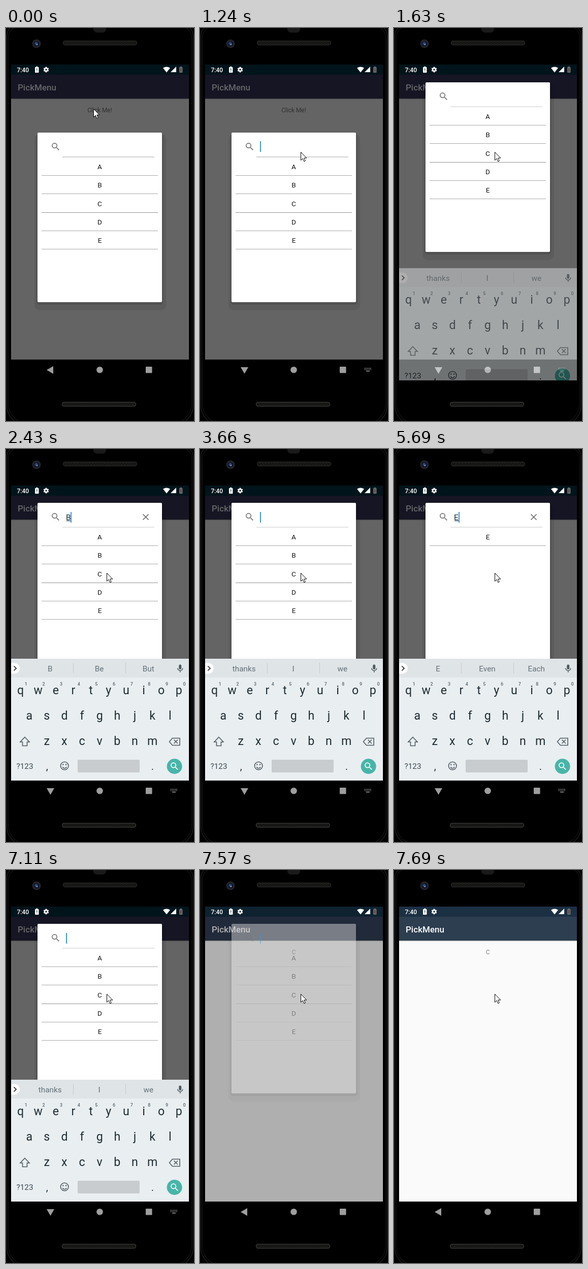
Animation, 370 px wide and 774 px high, one loop 8000 ms. Source, as an HTML page with a canvas:

```html
<!DOCTYPE html>
<html lang="en">
<head>
<meta charset="utf-8">
<title>Searchable list</title>
<style>
html, body { margin: 0; width: 100%; height: 100%; overflow: hidden; background: #000; }
canvas { display: block; width: 370px; height: 774px; }
</style>
</head>
<body>
<canvas id="stage" width="370" height="774"></canvas>
<script>
const LOOP = 8000;
const FONT = 'Roboto, "Open Sans", sans-serif';
const LENS = new Path2D('M15.5 14h-.79l-.28-.27A6.47 6.47 0 0 0 16 9.5 6.5 6.5 0 1 0 9.5 16c1.61 0 3.09-.59 4.23-1.57l.27.28v.79l5 4.99L20.49 19zM9.5 14a4.5 4.5 0 1 1 0-9 4.5 4.5 0 0 1 0 9z');
const stage = document.getElementById('stage').getContext('2d');
const board = document.createElement('canvas');
board.width = 370;
board.height = 240;
let c = stage;

// [start time, value] lists
const TYPED = [[0, ''], [2430, 'B'], [3660, ''], [4030, 'C'], [4580, ''], [4830, 'D'], [5260, ''], [5690, 'E'], [6090, '']];
const FILTER = TYPED.map(([t, v]) => [t === 2430 ? 2580 : t, v]);
const HINTS = TYPED.map(([t, v]) => [t === 5260 ? 5410 : t, v]);
const CARET = [[0, 0], [930, 1], [1510, 0], [1900, 1], [2980, 0], [3380, 1], [6520, 0], [7110, 1]];
const LIFT = [[0, 0], [1510, -62], [1630, -99], [1750, -100]];
const WORDS = {
  '': ['thanks', 'I', 'we'], B: ['B', 'Be', 'But'], C: ['C', 'Can', 'Call'],
  D: ['D', 'Do', 'Did'], E: ['E', 'Even', 'Each']
};

function at(list, t) {
  let v = list[0][1];
  for (const [start, value] of list) if (t >= start) v = value;
  return v;
}

function mix(a, b, k) {
  return `rgb(${a.map((v, i) => Math.round(v + (b[i] - v) * k)).join()})`;
}

function rect(x, y, w, h, color, r = 0) {
  c.fillStyle = color;
  c.beginPath();
  c.roundRect(x, y, w, h, r);
  c.fill();
}

function disc(x, y, r, color) {
  c.fillStyle = color;
  c.beginPath();
  c.arc(x, y, r, 0, 7);
  c.fill();
}

function trace(pts, closed) {
  c.beginPath();
  for (let i = 0; i < pts.length; i += 2) c.lineTo(pts[i], pts[i + 1]);
  if (closed) c.closePath();
}

function poly(pts, color) {
  trace(pts, true);
  c.fillStyle = color;
  c.fill();
}

function line(pts, color, width, closed) {
  trace(pts, closed);
  c.strokeStyle = color;
  c.lineWidth = width;
  c.stroke();
}

function text(s, x, y, size, color, align = 'center', weight = 400) {
  c.font = `${weight} ${size}px ${FONT}`;
  c.textAlign = align;
  c.fillStyle = color;
  c.fillText(s, x, y);
}

function lens(x, y, color) {
  c.save();
  c.translate(x, y);
  c.scale(.85, .85);
  c.fillStyle = color;
  c.fill(LENS);
  c.restore();
}

function speaker(x, y, edge) {
  rect(x, y, 146, 9, edge, 4.5);
  rect(x + 1, y + 1, 144, 7, '#151614', 3.5);
  for (let i = 0; i < 46; i++) {
    rect(x + 4 + i * 3, y + 3 + i % 2 * 2, 1.5, 1, '#2d2e2b');
  }
}

function phone() {
  rect(0, 0, 370, 774, '#000');
  for (const [inset, color] of [[1.5, '#1d1d1d'], [4.5, '#111']]) {
    c.strokeStyle = color;
    c.lineWidth = 1.5;
    c.beginPath();
    c.roundRect(inset, -9 + inset, 370 - inset * 2, 793 - inset * 2, [24, 24, 40, 40]);
    c.stroke();
  }
  rect(172, -8, 25, 17, '#1a1a1a', 7);
  speaker(112, 25, '#30312f');
  speaker(110, 736.5, '#4a4b48');
  disc(60, 31, 8.5, '#25252a');
  disc(60, 31, 5.5, '#101626');
  disc(59.5, 30.5, 3, '#28457f');
  disc(61, 32.5, 1.3, '#8fa6d8');
}

function status() {
  text('7:40', 21.5, 87, 12, '#fff', 'left', 500);
  rect(57, 77, 7.5, 11, '#fff', 1);
  rect(59, 75.8, 3.5, 2, '#fff');
  rect(60.2, 79.5, 1.2, 4, '#233');
  rect(60.2, 84.5, 1.2, 1.3, '#233');
  for (let i = 0; i < 6; i++) {
    const a = i * Math.PI / 3 + Math.PI / 6;
    line([79, 82, 79 + 5.4 * Math.cos(a), 82 + 5.4 * Math.sin(a)], '#fff', 2.6);
  }
  disc(79, 82, 4.2, '#fff');
  disc(79, 82, 1.7, '#122630');
  c.fillStyle = '#fff';
  c.beginPath();
  c.moveTo(316, 87.5);
  c.lineTo(309, 78.8);
  c.quadraticCurveTo(316, 74, 323, 78.8);
  c.fill();
  poly([324, 87, 335, 87, 335, 76], '#fff');
  rect(341, 77, 6.5, 11, '#68696b', 1);
  rect(342.5, 75.8, 3.5, 2, '#68696b');
  rect(343.5, 79.5, 1.5, 6, '#6b2e2a');
}

function app(dim, label) {
  rect(10, 92, 350, 561, mix([250, 250, 250], [100, 100, 100], dim));
  rect(10, 139, 350, 1, 'rgba(0,0,0,.22)');
  rect(10, 140, 350, 1, 'rgba(0,0,0,.08)');
  rect(10, 72, 350, 20, mix([28, 48, 68], [0, 20, 27], dim));
  rect(10, 92, 350, 47, mix([44, 62, 80], [22, 21, 36], dim));
  text('PickMenu', 23, 122.5, 17, mix([255, 255, 255], [102, 102, 106], dim), 'left', 500);
  text(label, 184.5, 165.5, 11.9, mix([125, 125, 125], [48, 48, 48], dim));
  status();
}

function nav(open) {
  const color = '#9e9e9e';
  poly(open ? [80, 668, 95, 668, 87.5, 681] : [80, 673.5, 93, 666, 93, 681], color);
  disc(184.5, 673.3, 6.3, color);
  rect(275, 667, 12.5, 12.5, color, 1);
  if (!open) return;
  for (let row = 0; row < 3; row++) {
    for (let i = 0; i < 6; i++) {
      if (row < 2) rect(323.5 + i * 2.4, 669.5 + row * 2.7, 1.4, 1.4, color);
    }
  }
  rect(327, 675, 7, 1.4, color);
}

function dialog(t, lift) {
  const typed = at(TYPED, t), only = at(FILTER, t);
  c.save();
  c.translate(0, lift);
  rect(56, 208, 259, 348, 'rgba(0,0,0,.08)', 11);
  rect(60, 208, 249.5, 337, 'rgba(0,0,0,.12)', 5);
  rect(62, 206, 245, 334, '#fff', 2);
  lens(87.5, 223.5, '#757575');
  rect(111, 253.5, 181, 1, lift ? '#c9c9c9' : '#a5a5a5');
  (only || 'ABCDE').split('').forEach((s, i) => {
    text(s, 184.5, 278 + Math.round(i * 36.25), 13.6, '#151515');
    rect(70, 290 + Math.round(i * 36.25), 229, 1, i === 2 ? '#929292' : '#a9a9a9');
  });
  if (typed) {
    text(typed, 118, 240, 15.3, '#222', 'left');
    rect(119, 241, 8.5, 1, '#222');
    line([269.5, 228.5, 280.5, 239.5], '#666', 1.6);
    line([280.5, 228.5, 269.5, 239.5], '#666', 1.6);
  }
  if (at(CARET, t)) rect(typed ? 127 : 118, lift ? 224 : 223, 2, 21, '#3c97dc');
  c.restore();
}

function keys(hints) {
  const ink = '#1e2d34', soft = '#4e5a60';
  c = board.getContext('2d');
  c.save();
  c.clearRect(0, 0, 370, 240);
  c.translate(0, -413);
  rect(10, 413, 350, 240, '#e9eef1');
  rect(10, 413, 350, 37, '#dfe4e7');
  rect(10, 421.5, 17, 21, '#fff', [0, 10.5, 10.5, 0]);
  line([15.5, 427.5, 20, 432, 15.5, 436.5], '#222', 1.7);
  rect(132, 421, 1, 21, '#c3c9cc');
  rect(235, 421, 1, 21, '#c3c9cc');
  hints.forEach((s, i) => text(s, 86.7 + i * 96.8, 437.5, 15.3, '#647077'));

  rect(340.2, 424.5, 5, 9.5, soft, 2.5);
  c.beginPath();
  c.arc(342.7, 431.5, 5, 0, Math.PI);
  c.strokeStyle = soft;
  c.lineWidth = 1.5;
  c.stroke();
  rect(342, 436, 1.5, 4, soft);

  const rows = [['qwertyuiop', 28.5, 482.5], ['asdfghjkl', 45.7, 532.5], ['zxcvbnm', 80.2, 583]];
  for (const [letters, x, y] of rows) {
    letters.split('').forEach((s, i) => text(s, x + i * 34.65, y, 23.2, ink));
  }
  for (let i = 0; i < 10; i++) text((i + 1) % 10, 39.3 + i * 34.65, 466, 9, '#58656b', 'center', 500);

  line([37, 567.5, 46, 577, 41.5, 577, 41.5, 584.5, 32.5, 584.5, 32.5, 577, 28, 577], soft, 1.6, true);
  line([321.5, 576.5, 327.5, 569.5, 342, 569.5, 342, 583.5, 327.5, 583.5], soft, 1.6, true);
  line([330.5, 572.5, 338, 580], soft, 1.6);
  line([338, 572.5, 330.5, 580], soft, 1.6);

  text('?123', 37, 630, 15.3, '#3a484f');
  text(',', 80.7, 632, 20, ink);
  text('.', 288.3, 632, 20, ink);
  c.strokeStyle = soft;
  c.lineWidth = 1.6;
  c.beginPath();
  c.arc(115.2, 624, 7.8, 0, 7);
  c.stroke();
  c.beginPath();
  c.arc(115.2, 624.8, 4, .3, Math.PI - .3);
  c.stroke();
  disc(112.3, 621.5, 1.3, soft);
  disc(118.1, 621.5, 1.3, soft);
  rect(141, 612, 122, 25, '#c8cccf', 2);
  disc(331.6, 625, 15, '#47b5a8');
  lens(321.5, 614.8, '#fff');
  c.restore();
  c = stage;
}

function keyboard(t) {
  if (t < 1630 || t >= 7570) return;
  const [drop, alpha] = t < 1750 ? [60, .48] : t < 1900 ? [8, .94] : [0, 1];
  keys(WORDS[at(HINTS, t)]);
  c.save();
  c.beginPath();
  c.rect(10, 72, 350, 622);
  c.clip();
  c.globalAlpha = alpha;
  c.drawImage(board, 0, 413 + drop);
  c.restore();
}

function pointer(t) {
  const step = t < 270 ? 0 : Math.min(4, Math.floor((t - 270) / 120) + 1);
  const k = step / 4, ease = k * k * (3 - 2 * k);
  const x = 172 + 26 * ease, y = t < 780 ? 159 + 74 * ease : 244;
  c.save();
  c.translate(Math.round(x) + .5, Math.round(y) + .5);
  const arrow = [0, 0, 0, 16, 3.7, 12.6, 6.3, 18.3, 8.8, 17.2, 6.3, 11.6, 11.3, 11.6];
  poly(arrow, '#fff');
  line(arrow, '#000', 1, true);
  c.restore();
}

function draw(t) {
  const closing = t >= 7570, done = t >= 7690;
  phone();
  app(done ? 0 : closing ? .5 : 1, closing ? 'C' : 'Click Me!');
  nav(t >= 1240 && !closing);
  if (!done) {
    c.globalAlpha = closing ? .4 : 1;
    dialog(t, at(LIFT, t));
    c.globalAlpha = 1;
  }
  keyboard(t);
  pointer(t);
}

const begin = performance.now();
function tick() {
  draw((performance.now() - begin) % LOOP);
  requestAnimationFrame(tick);
}
tick();
</script>
</body>
</html>
```
